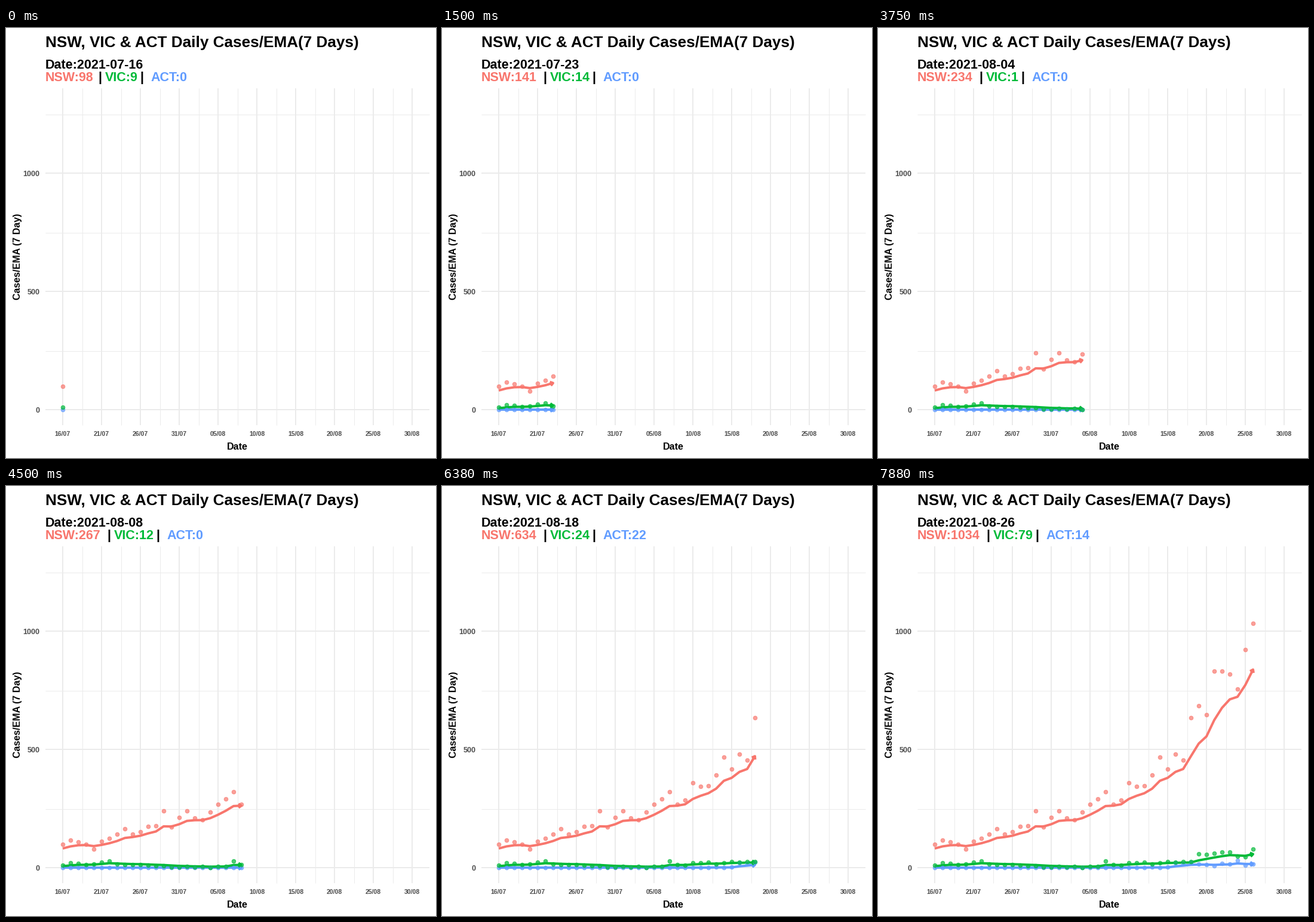
A matplotlib script that plays this animation: 720x720 px, repeating every 8 s.

```python
import math

import matplotlib.pyplot as plt
import numpy as np
from matplotlib.animation import FuncAnimation

plt.rcParams["font.family"] = "Liberation Sans"
plt.rcParams["font.weight"] = "bold"

SIZE = 720
LOOP, INTERVAL = 8000, 25
STEP = 187.5  # ms per day
START = np.datetime64("2021-07-16")
RED, GREEN, BLUE = "#F8766D", "#00BA38", "#619CFF"
GRID, TICK = "#EBEBEB", "#4D4D4D"

NSW = [98, 116, 109, 98, 78, 111, 124, 141, 164, 141, 152, 174, 177, 240,
       172, 212, 240, 209, 202, 234, 267, 291, 320, 267, 285, 358, 344, 347,
       392, 467, 417, 480, 454, 634, 684, 646, 831, 831, 819, 755, 921, 1034]
VIC = [9, 20, 18, 13, 16, 23, 28, 14, 12, 12, 13, 10, 8, 8,
       3, 2, 4, 2, 4, 1, 6, 6, 29, 12, 11, 20, 20, 23,
       16, 21, 25, 22, 24, 24, 57, 55, 61, 65, 66, 48, 45, 79]
ACT = [0] * 27 + [1, 2, 1, 2, 19, 17, 22, 16, 13, 8, 17, 16, 30, 9, 14]


def px(day):
    return 95 + 13 * np.asarray(day, float)


def py(value):
    return 639 - 0.396 * np.asarray(value, float)


def ema(values, last, span=7):
    out = [last]
    for v in values[1:]:
        last += (v - last) * 2 / (span + 1)
        out.append(last)
    return np.array(out)


fig = plt.figure(figsize=(SIZE / 72, SIZE / 72), dpi=72, facecolor="white")
ax = fig.add_axes([0, 0, 1, 1])
ax.set_xlim(0, SIZE)
ax.set_ylim(SIZE, 0)
ax.axis("off")


def rule(xs, ys, width):
    ax.plot(xs, ys, color=GRID, lw=width, solid_capstyle="butt", zorder=1)


def label(x, y, text, size, color="black", **kw):
    return ax.text(x, y, text, fontsize=size, color=color, va="baseline", **kw)


# Panel grid and axis labels
for y in (144.5, 342.5, 540.5):
    rule([66, 709], [y, y], 1)
for k in range(9):
    rule([px(5 * k + 2.5)] * 2, [101, 665], 1)
for v in (0, 500, 1000):
    rule([66, 709], [py(v)] * 2, 2)
    label(56.5, py(v) + 5, str(v), 12.5, TICK, ha="right")
for day in range(0, 50, 5):
    rule([px(day)] * 2, [101, 665], 2)
    _, month, dom = str(START + day).split("-")
    label(px(day), 683, f"{dom}/{month}", 10.5, TICK, ha="center")

label(66, 32, "NSW, VIC & ACT Daily Cases/EMA(7 Days)", 26.1)
label(387, 706, "Date", 16, ha="center")
label(24, 383, "Cases/EMA (7 Day)", 16, ha="center",
      rotation=90, rotation_mode="anchor")

# Subtitle
date_text = label(66, 68, "", 21.55)
nsw_text = label(66, 89, "", 21.55, RED)
vic_text = label(166, 89, "", 21.55, GREEN)
act_text = label(242, 89, "", 21.55, BLUE)
bars = [label(0, 89, "|", 21.55, ha="center") for _ in range(2)]


class Series:
    def __init__(self, values, first, color, z):
        self.y = py(values)
        self.mean = py(ema(values, first))
        style = dict(color=color, lw=4, solid_capstyle="butt",
                     solid_joinstyle="round", zorder=2 + z)
        self.line, = ax.plot([], [], **style)
        self.head, = ax.plot([], [], **style)
        self.dots, = ax.plot([], [], "o", color=color, ms=6.6, mew=1,
                             alpha=0.7, zorder=6 + z)

    def show(self, day):
        x = px(np.arange(day + 1))
        self.dots.set_data(x, self.y[:day + 1])
        if day == 0:
            self.line.set_data([], [])
            self.head.set_data([], [])
            return
        m = self.mean[:day + 1]
        self.line.set_data(x, m)
        back = math.atan2(m[-2] - m[-1], x[-2] - x[-1])
        ends = [back - math.radians(35), back + math.radians(35)]
        hx, hy = [x[-1] + 5.7 * math.cos(a) for a in ends], \
                 [m[-1] + 5.7 * math.sin(a) for a in ends]
        self.head.set_data([hx[0], x[-1], hx[1]], [hy[0], m[-1], hy[1]])


series = [Series(ACT, 0, BLUE, 0), Series(NSW, 81, RED, 1),
          Series(VIC, 6, GREEN, 2)]


def update(i):
    t = (i + 0.5) * INTERVAL
    day = max(0, int(t // STEP) - 1)
    for s in series:
        s.show(day)

    n, v, a = NSW[day], VIC[day], ACT[day]
    date_text.set_text(f"Date:{START + day}")
    nsw_text.set_text(f"NSW:{n}")
    vic_text.set_text(f"VIC:{v}")
    act_text.set_text(f"ACT:{a}")
    vic_x = 166 if n < 100 else 181 + 12 * (len(str(n)) - 3)
    end = vic_x + 12 * len(str(v))
    vic_text.set_x(vic_x)
    bars[0].set_x(vic_x - 8.5)
    bars[1].set_x(end + 49.5)
    act_text.set_x(end + 64.5)
    return []


anim = FuncAnimation(fig, update, frames=LOOP // INTERVAL, interval=INTERVAL,
                     init_func=lambda: update(0), repeat=True, repeat_delay=0,
                     blit=False)
plt.show()
```
